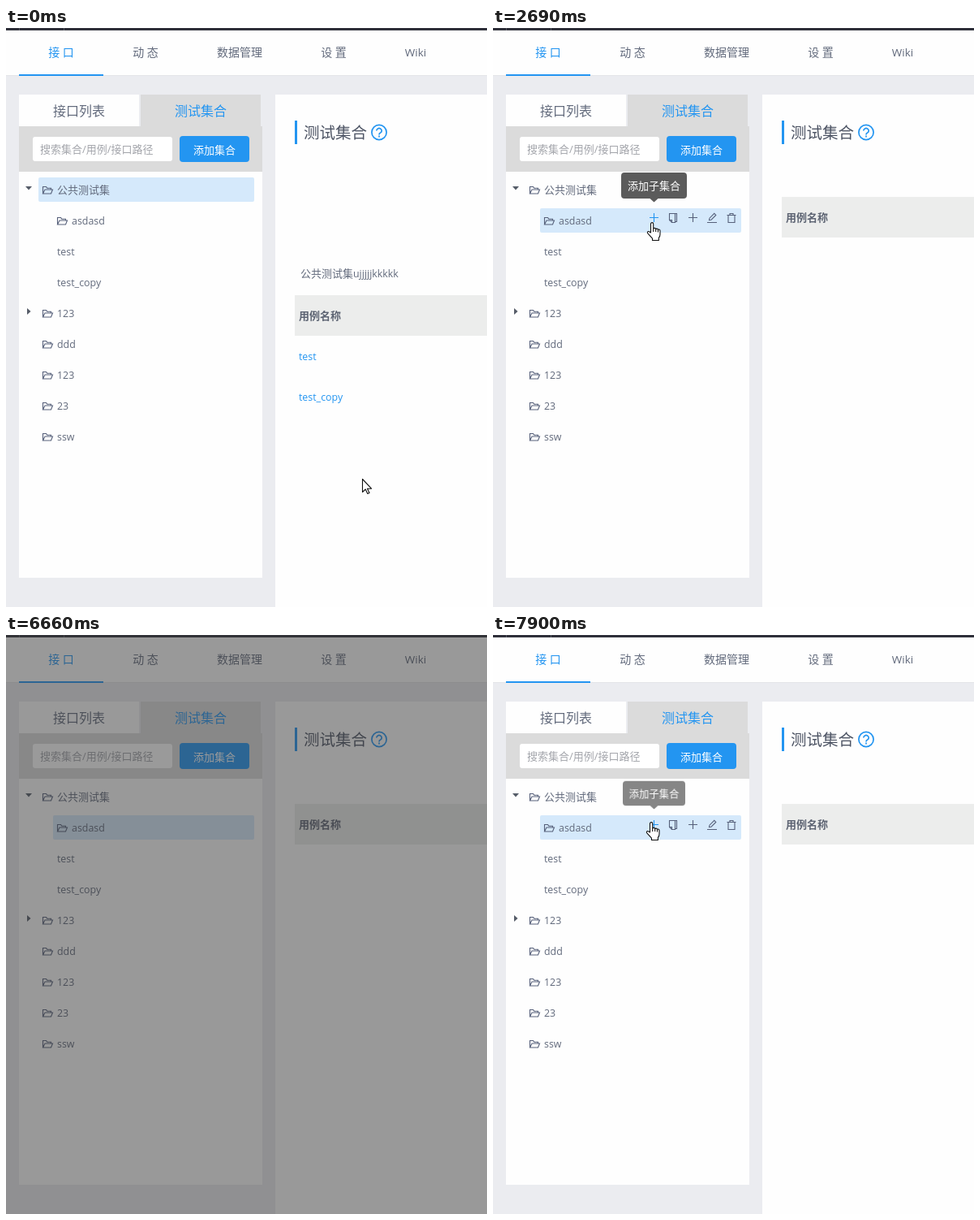
These frames come from a looping animation (593x713 px, 8000 ms). An HTML page:

```html
<!DOCTYPE html>
<html lang="zh-CN">
<head>
<meta charset="utf-8">
<title>测试集合</title>
<style>
html, body { margin: 0; width: 100%; height: 100%; overflow: hidden; background: #ecedf1; }
svg { display: block; width: 100%; height: 100%; }
text { font: 13px 'Open Sans', 'Noto Sans CJK SC', 'Noto Sans CJK', sans-serif; fill: #626a7c; white-space: pre; }
.nav { font-size: 14px; text-anchor: middle; }
.tab { font-size: 16px; text-anchor: middle; }
.title { font-size: 19.5px; font-weight: 300; fill: #4d5464; }
.lat { font-size: 12.4px; }
.blue { fill: #2395f1; }
.white { fill: #fff; }
.hint { fill: #a3a5ab; }
.bold { font-weight: 700; fill: #5c6372; }
.line { fill: none; stroke: #56607a; stroke-width: 1.1; }
.gray { fill: #dbdbdb; }
.pick { fill: #d5e9fb; }
.soft { fill: #ebf4fd; }

.step { animation: 8s step-end -4ms infinite; }
.pos { animation-name: pos; }
.arrow { animation-name: arrow; }
.hand { animation-name: hand; }
.faint, .testTools { animation-name: testTools; }
.dirTools { animation-name: dirTools; }
.pickTop, .toolsBack { animation-name: untilPick; }
.pickDir { animation-name: afterPick; }
.list { animation-name: list; }
.table { animation-name: table; }
.head { animation-name: head; fill: #ecedec; }
.plus { animation-name: plus; }
.tip { animation-name: tip; transform-origin: 198.5px 214px; }
.mask { animation-name: mask; fill: #373737; }

@keyframes pos {
  0% { transform: translate(439px, 555px); }
  6.75% { transform: translate(159px, 332px); }
  8.625% { transform: translate(140px, 306px); }
  10.125% { transform: translate(136px, 295px); }
  12% { transform: translate(135px, 294px); }
  14% { transform: translate(117px, 271px); }
  15.875% { transform: translate(83px, 246px); }
  17.375% { transform: translate(95px, 243px); }
  19.375% { transform: translate(94px, 238px); }
  28% { transform: translate(141px, 228px); }
  29.875% { transform: translate(188px, 240px); }
  31.75% { transform: translate(189px, 240px); }
  33.625% { transform: translate(189px, 239px); }
  90.125% { transform: translate(326px, 285px); }
  92.125% { transform: translate(205px, 289px); }
  93.875% { transform: translate(150px, 252px); }
  95.375% { transform: translate(152px, 241px); }
  97.25% { transform: translate(178px, 235px); }
  98.75%, 100% { transform: translate(188px, 230px); }
}
@keyframes arrow {
  0% { opacity: 1; }
  8.625% { opacity: 0; }
  90.125% { opacity: 1; }
  92.125%, 100% { opacity: 0; }
}
@keyframes hand {
  0% { opacity: 0; }
  8.625% { opacity: 1; }
  49.875% { opacity: 0; }
  92.125%, 100% { opacity: 1; }
}
@keyframes testTools {
  0% { opacity: 0; }
  14% { opacity: 1; }
  15.875%, 100% { opacity: 0; }
}
@keyframes dirTools {
  0% { opacity: 0; }
  15.875% { opacity: 1; }
  42.125% { opacity: 0; }
  97.25%, 100% { opacity: 1; }
}
@keyframes untilPick {
  0% { opacity: 1; }
  25%, 100% { opacity: 0; }
}
@keyframes afterPick {
  0% { opacity: 0; }
  25%, 100% { opacity: 1; }
}
@keyframes list {
  0% { opacity: 1; }
  23.125%, 100% { opacity: 0; }
}
@keyframes table {
  0% { transform: translateY(121px); }
  28%, 100% { transform: none; }
}
@keyframes head {
  0% { fill: #ecedec; }
  44% { fill: #fefefe; }
  83.25%, 100% { fill: #ecedec; }
}
@keyframes plus {
  0% { stroke: #56607a; }
  29.875%, 100% { stroke: #2395f1; }
}
@keyframes tip {
  0% { opacity: 0; transform: none; }
  33.625% { opacity: 1; transform: none; }
  42.125% { opacity: .5; transform: scale(.92); }
  44% { opacity: 0; transform: none; }
  98.75%, 100% { opacity: .74; transform: scale(.95); }
}
@keyframes mask {
  0% { opacity: 0; }
  42.125% { opacity: .28; }
  44% { opacity: .6; }
  83.25% { opacity: .5; }
  84.75% { opacity: .15; }
  86.625%, 100% { opacity: 0; }
}
</style>
</head>
<body>
<svg viewBox="0 0 593 713">
  <defs>
    <path id="folder" class="line" d="M.5 9V.5H4.500L5.800 2.200H10.500V4M.5 9L3 4H12.500L10.500 9z"/>
    <path id="scan" d="M-5-2.5V-5H-2M2-5H5V-2.5M5 2.5V5H2M-2 5H-5V2.5M-5.5 0H5.5"/>
    <path id="copy" d="M-2.5-5.5H4.5V4.5H2.5M-4.5-5.5H2.5V5.5H-1.5L-4.5 2.5zM-4.5 2.5H-1.5V5.5"/>
    <path id="add" d="M-5.5 0H5.5M0-5.5V5.5"/>
    <path id="edit" d="M-6 5.5H6M-3.5 2.5L-3 .2 2.8-5.6 4.8-3.6-1 2.2z"/>
    <path id="trash" d="M-5.5-3.5H5.5M-2-3.5V-5.5H2V-3.5M-4-3.5V5.5H4V-3.5"/>
  </defs>

  <rect width="593" height="713" fill="#ebecf0"/>
  <rect width="593" height="58" fill="#fefefe"/>
  <rect y="58" width="593" height="1" fill="#e4e5e8"/>
  <rect width="593" height="3" fill="#2f303a"/>
  <path d="M16.5 0V3M71.5 0V3" stroke="#585a63"/>
  <rect class="blue" x="16" y="57" width="104" height="2"/>
  <text class="nav blue" x="68" y="35">接 口</text>
  <text class="nav" x="172" y="35">动 态</text>
  <text class="nav" x="288" y="35">数据管理</text>
  <text class="nav" x="404" y="35">设 置</text>
  <text class="nav" x="505" y="35" style="font-size:13.5px">Wiki</text>

  <rect x="16" y="82" width="300" height="595" fill="#fefefe"/>
  <path fill="#ebecf0" d="M164 82h2v39h-2zM314 82h2v39h-2z"/>
  <path class="gray" d="M166 82H314V121H316V177H16V121H166z"/>
  <text class="tab" x="90" y="107.500">接口列表</text>
  <text class="tab blue" x="240" y="107.500">测试集合</text>
  <rect class="white" x="33" y="134" width="172" height="30" rx="3"/>
  <text class="hint" x="42" y="154">搜索集合/用例/接口路径</text>
  <rect class="blue" x="214" y="133" width="86" height="32" rx="4"/>
  <text class="white" x="231" y="155">添加集合</text>

  <rect class="step pickTop pick" x="40" y="184" width="266" height="30" rx="2"/>
  <rect class="step pickDir pick" x="58" y="222" width="248" height="30" rx="2"/>
  <rect class="step faint" x="63" y="260" width="243" height="60" fill="#fafdff"/>
  <path fill="#555c68" d="M24 195H32L28 199.500zM26 345V353L30.500 349z"/>
  <g id="tree"></g>

  <g class="step testTools">
    <rect class="soft" x="234" y="260" width="72" height="25"/>
    <g class="line">
      <use href="#scan" x="246" y="272"/>
      <use href="#copy" x="270" y="272"/>
      <use href="#trash" x="294" y="272"/>
    </g>
  </g>
  <g class="step dirTools">
    <rect class="step toolsBack soft" x="186" y="222" width="120" height="25"/>
    <g class="line">
      <use class="step plus" href="#add" x="198.500" y="233.500"/>
      <use href="#copy" x="222" y="234"/>
      <use href="#add" x="246.500" y="233.500"/>
      <use href="#edit" x="270" y="234"/>
      <use href="#trash" x="294" y="234"/>
    </g>
  </g>

  <rect x="332" y="82" width="261" height="631" fill="#fefefe"/>
  <rect class="blue" x="356" y="114" width="3" height="29"/>
  <text class="title" x="367" y="136">测试集合</text>
  <g fill="none" stroke="#2395f1" stroke-width="1.7">
    <circle cx="460" cy="128.500" r="9.100"/>
    <path d="M456.800 126.500a3.200 3 0 1 1 4.800 2.600q-1.600.8-1.600 2.400M460 132.600v1.900"/>
  </g>
  <g class="step table">
    <rect class="step head" x="356" y="208" width="237" height="50"/>
    <text class="bold" x="361" y="238">用例名称</text>
  </g>
  <g class="step list">
    <text x="363" y="307">公共测试集<tspan class="lat">ujjjjjkkkkk</tspan></text>
    <text class="lat blue" x="361" y="409">test</text>
    <text class="lat blue" x="361" y="459">test_copy</text>
  </g>

  <g class="step tip">
    <path fill="#404040" fill-opacity=".86" d="M162 178H235q4 0 4 4V206q0 4-4 4H203.500L198.500 214.500 193.500 210H162q-4 0-4-4V182q0-4 4-4z"/>
    <text class="white" x="166" y="199">添加子集合</text>
  </g>

  <rect class="step mask" width="593" height="713"/>

  <g class="step pos" fill="#fff" stroke="#111" stroke-width="1.1" stroke-linejoin="round">
    <path class="step arrow" d="M.5.5V16.500L4.200 13 6.800 18.500 9 17.500 6.500 12.200H11.500z"/>
    <path class="step hand" d="M5.500 13V2.200a1.600 1.600 0 0 1 3.200 0V8.200q.2-.8 1.500-.8t1.500 1.300q.3-.6 1.400-.6t1.400 1.300q.4-.5 1.200-.4 1.300.2 1.300 1.800V15q0 2.600-1.600 4.400V22.500H7.500V20.200L2 14.200q-1.200-1.400-.2-2.400 1-.8 2.200.2zM8.700 8.200V12M11.700 8.700V12M14.500 9.400V12.500"/>
  </g>
</svg>
<script>
// Tree rows: label, indent, whether a folder icon precedes it
const rows = [
  ['公共测试集', 45, true], ['asdasd', 63, true], ['test', 63], ['test_copy', 63],
  ['123', 45, true], ['ddd', 45, true], ['123', 45, true], ['23', 45, true], ['ssw', 45, true]
];
document.getElementById('tree').innerHTML = rows.map(([label, x, folder], i) => {
  const y = 199 + i * 38;
  const icon = folder ? `<use href="#folder" x="${x}" y="${y - 4}"/>` : '';
  const cls = i ? 'lat' : '';
  return `${icon}<text class="${cls}" x="${folder ? x + 18 : x}" y="${y + 5}">${label}</text>`;
}).join('');
</script>
</body>
</html>
```
